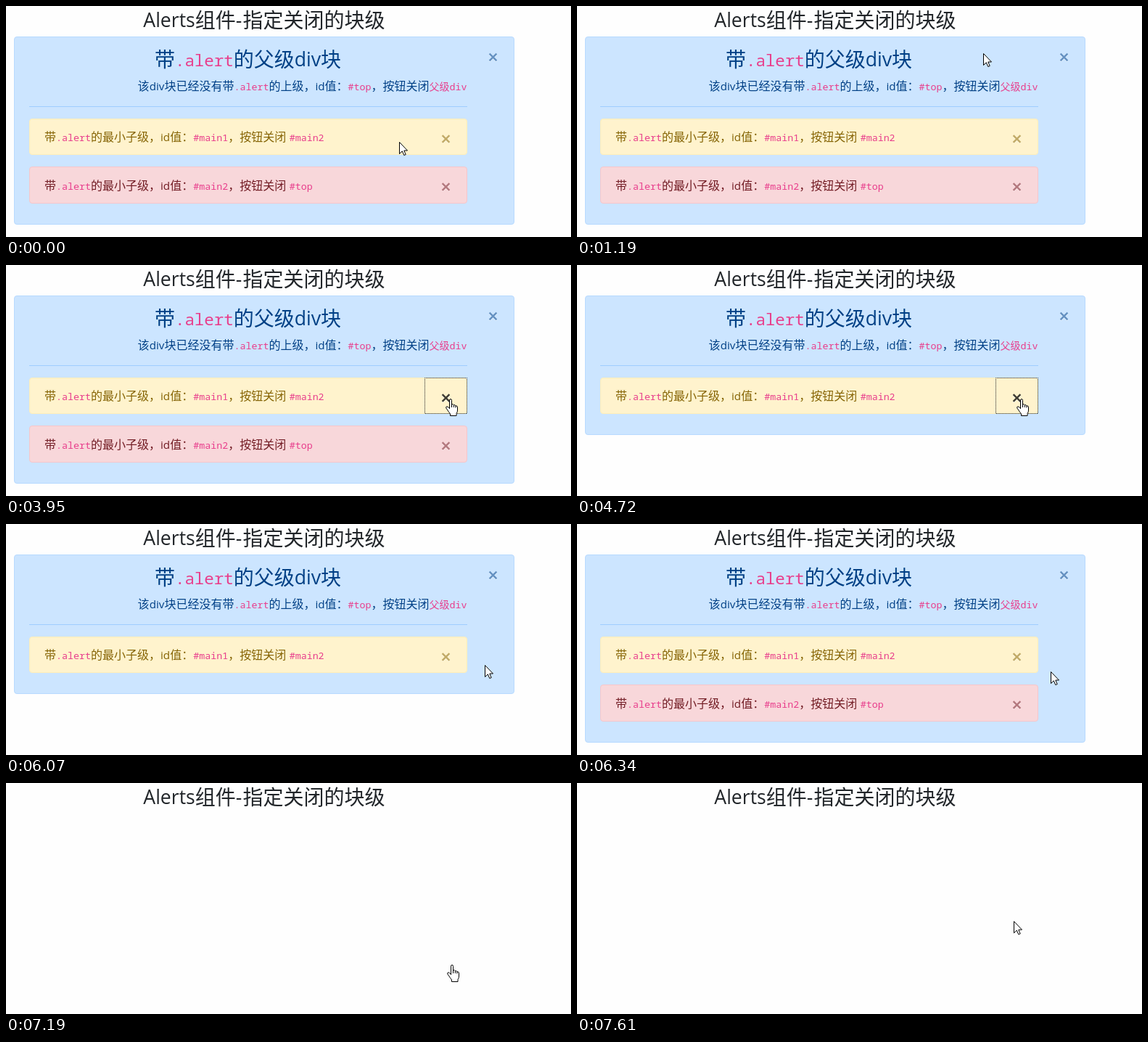
Animation of 779x318 px, one loop 8 s. Source, as an HTML page:

```html
<!DOCTYPE html>
<html lang="zh-CN">
<head>
<meta charset="utf-8">
<title>Alerts</title>
<style>
html, body { margin: 0; width: 100%; height: 100%; overflow: hidden; background: #fefefe; }
svg { display: block; }
text { white-space: pre; text-spacing-trim: space-all; word-spacing: 0.5px; }
.cjk { font-family: "Noto Sans CJK SC", "Noto Sans CJK", sans-serif; }
.latin { font-family: "Open Sans", "Noto Sans", sans-serif; }
.mono { font-family: "Noto Sans Mono", "DejaVu Sans Mono", monospace; fill: #e83e8c; }
.code { fill: #e83e8c; }
</style>
</head>
<body>
<svg id="stage" width="779" height="318" viewBox="0 0 779 318"></svg>
<script>
const LOOP = 8000;
const NS = 'http://www.w3.org/2000/svg';

function add(parent, tag, attrs = {}, content = '') {
  const el = document.createElementNS(NS, tag);
  for (const key in attrs) el.setAttribute(key, attrs[key]);
  el.textContent = content;
  parent.appendChild(el);
  return el;
}

// Text in braces is inline code; each script gets its own font and size.
// Chinese glyphs sit slightly below the shared baseline.
function label(parent, str, x, y, fill, size = 16, anchor = 'start') {
  const line = add(parent, 'text', { x, y, fill, 'text-anchor': anchor });
  const monoSize = size === 16 ? 13.33 : size * 0.802;
  let drop = 0;
  str.split(/[{}]/).forEach((part, i) => {
    const code = i % 2 === 1;
    for (const run of part.match(/[ -~]+|[^ -~]+/g) || []) {
      const ascii = run.charCodeAt(0) < 128;
      const font = ascii ? (code ? 'mono' : 'latin') : (code ? 'cjk code' : 'cjk');
      const px = ascii ? (code ? monoSize : size * 0.95) : size * (code ? 0.875 : 1);
      const sink = ascii ? 0 : size * 0.03;
      add(line, 'tspan', { class: font, 'font-size': px, dy: sink - drop }, run);
      drop = sink;
    }
  });
}

function panel(parent, x, y, w, h, fill, stroke) {
  return add(parent, 'rect', {
    x: x + 0.5, y: y + 0.5, width: w - 1, height: h - 1, rx: 3.5, fill, stroke
  });
}

function closeButton(parent, x, y, color) {
  const g = add(parent, 'g', { transform: `translate(${x} ${y})`, fill: 'none', 'stroke-width': 2.4 });
  const d = 'M-4.9-4.9L4.9 4.9M4.9-4.9L-4.9 4.9';
  add(g, 'path', { d, stroke: '#fff', transform: 'translate(0 1)' });
  const cross = add(g, 'path', { d });
  return hover => {
    g.setAttribute('opacity', hover ? 0.75 : 0.5);
    cross.setAttribute('stroke', hover ? '#000' : color);
  };
}

function focusRing(parent, y, h) {
  return add(parent, 'rect', {
    x: 577.5, y: y + 0.5, width: 58, height: h - 1, fill: 'none',
    stroke: '#212529', 'stroke-dasharray': '1 1', 'stroke-dashoffset': 0.5
  });
}

function alertRow(parent, y, h, base, crossY, text, [bg, border, color]) {
  const g = add(parent, 'g');
  panel(g, 32, y, 604, h, bg, border);
  label(g, text, 53, base, color);
  return { g, hover: closeButton(g, 606.5, crossY, color), ring: focusRing(g, y, h) };
}

const stage = document.getElementById('stage');

label(stage, 'Alerts组件-', 189.3, 29, '#212529', 28);
label(stage, '指定关闭的块级', 326.5, 29, '#212529', 28);

const block = add(stage, 'g');
const blockPanel = panel(block, 11, 42, 690, 259, '#cce5ff', '#b8daff');
label(block, '带{.alert}的父级div块', 333.5, 83, '#004085', 28, 'middle');
label(block, '该div块已经没有带{.alert}的上级，id值：{#top}，按钮关闭{父级div}', 635.6, 116, '#004085', 16, 'end');
add(block, 'rect', { x: 32, y: 138, width: 604, height: 1, fill: '#9fcdff' });
closeButton(block, 671.5, 70.5, '#004085')(false);

const rows = {
  main1: alertRow(block, 155, 50, 186, 183,
    '带{.alert}的最小子级，id值：{#main1}，按钮关闭 {#main2}', ['#fff3cd', '#ffeeba', '#856404']),
  main2: alertRow(block, 221, 51, 253, 249,
    '带{.alert}的最小子级，id值：{#main2}，按钮关闭 {#top}', ['#f8d7da', '#f5c6cb', '#721c24'])
};

const cursors = { arrow: add(stage, 'g'), hand: add(stage, 'g'), beam: add(stage, 'g') };
const ink = { fill: '#fff', stroke: '#000', 'stroke-linejoin': 'round' };
add(cursors.arrow, 'path', { ...ink, d: 'M.5.5V16.5L4.3 12.8L6.8 18.5L9.2 17.5L6.8 12H11.5Z' });
add(cursors.hand, 'path', { ...ink,
  d: 'M5.5 2.5Q5.5.5 7 .5T8.5 2.5V8Q10.8 7 11.3 8.7Q13.3 8 13.8 9.8Q16.5 9.3 16.5 12V16' +
     'Q16.5 18.5 15 20.5V23.5H6.5V21Q4.5 18.5 3 16L.8 13Q.2 11 2 10.8Q3.8 11 5.5 13.5Z' });
add(cursors.hand, 'path', { ...ink, fill: 'none', d: 'M5.5 2.5V14M8.5 8V12M11.3 9V12M13.9 10V12.5' });
add(cursors.beam, 'path', { ...ink, fill: 'none', d: 'M.5.5H2.5L3.5 1.5L4.5.5H6.5M3.5 1.5V14.5M.5 15.5H2.5L3.5 14.5L4.5 15.5H6.5' });

// time, cursor, x, y, hovered row
const pointer = [
  [0, 'arrow', 542, 187], [530, 'arrow', 576, 158], [650, 'arrow', 597, 135],
  [800, 'arrow', 616, 117], [920, 'arrow', 639, 90], [1070, 'arrow', 606, 73],
  [1190, 'arrow', 560, 65], [1310, 'arrow', 524, 72], [1430, 'arrow', 582, 89],
  [1680, 'beam', 599, 111], [1830, 'arrow', 642, 155], [1950, 'arrow', 620, 212],
  [2100, 'arrow', 606, 220], [2250, 'hand', 601, 243, 'main2'],
  [3250, 'arrow', 610, 209], [3370, 'hand', 607, 201],
  [3520, 'hand', 607, 186, 'main1'], [3670, 'hand', 606, 184, 'main1'],
  [5120, 'arrow', 640, 186], [5240, 'arrow', 653, 195], [5370, 'arrow', 662, 202],
  [5490, 'arrow', 664, 201], [5800, 'arrow', 664, 199], [5950, 'arrow', 662, 196],
  [6070, 'arrow', 660, 194], [6190, 'arrow', 659, 194], [6340, 'arrow', 653, 203],
  [6490, 'arrow', 632, 224], [6620, 'hand', 611, 248, 'main2'],
  [6770, 'hand', 608, 250, 'main2'], [7310, 'arrow', 613, 249],
  [7460, 'arrow', 602, 195], [7610, 'arrow', 602, 190]
];
const focus = [[0, ''], [3950, 'main1'], [5490, ''], [6920, 'main2']];
const main2Opacity = [[0, 1], [4580, 0.4], [4720, 0], [6190, 1]];
const blockOpacity = [[0, 1], [7040, 0.83], [7190, 0]];
const blockHeight = [[0, 259], [4720, 192], [6190, 259]];

const at = (steps, t) => steps.filter(step => step[0] <= t).pop();

function draw(t) {
  const [, kind, x, y, hovered] = at(pointer, t);
  const focused = at(focus, t)[1];
  for (const name in cursors) {
    cursors[name].setAttribute('visibility', name === kind ? 'visible' : 'hidden');
  }
  cursors[kind].setAttribute('transform', `translate(${x} ${y})`);
  for (const name in rows) {
    rows[name].hover(name === hovered);
    rows[name].ring.setAttribute('visibility', name === focused ? 'visible' : 'hidden');
  }
  rows.main2.g.setAttribute('opacity', at(main2Opacity, t)[1]);
  block.setAttribute('opacity', at(blockOpacity, t)[1]);
  blockPanel.setAttribute('height', at(blockHeight, t)[1] - 1);
}

const start = performance.now();
function tick() {
  draw((performance.now() - start) % LOOP);
  requestAnimationFrame(tick);
}
tick();
</script>
</body>
</html>
```
